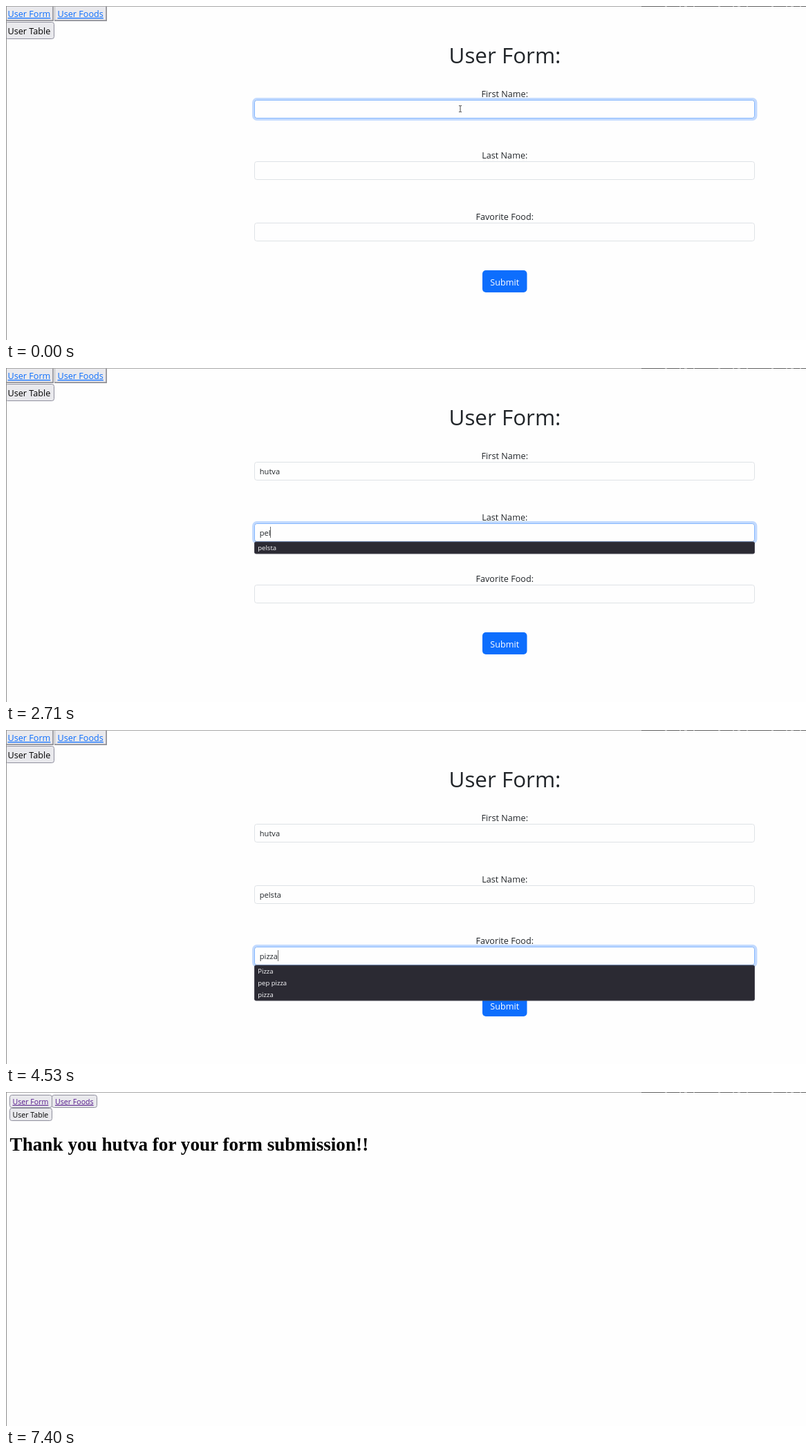
An HTML page that plays this animation: 1157 px wide and 484 px high, repeating every 7.99 s.

```html
<!DOCTYPE html>
<html lang="en">
<head>
<meta charset="utf-8">
<title>User Form</title>
<style>
  html, body { margin: 0; width: 100%; height: 100%; overflow: hidden; background: #fefefe; }
  svg { display: block; width: 1157px; height: 484px; }
  text { font-family: "Open Sans", "Noto Sans", sans-serif; font-size: 12.65px; fill: #212529; }
  .mid { text-anchor: middle; }
  .title { font-size: 31.4px; }
  .value { font-size: 11.1px; }
  .item { font-size: 9.5px; fill: #fbfbfe; }
  .link { fill: #0d6efd; text-decoration: underline; }
  .small { font-size: 10.6px; fill: #000; }
  .visited { fill: #551a8b; text-decoration: underline; }
  .thanks { font: bold 27.2px "Liberation Serif", "Times New Roman", serif; fill: #000; }
</style>
</head>
<body>
<svg id="stage" viewBox="0 0 1157 484" xmlns="http://www.w3.org/2000/svg"></svg>
<script>
const LOOP = 7990;
const FIRST = "hutva", LAST = "pelsta", FOOD = "pizza";
const ROW = 17;
const stage = document.getElementById("stage");

function add(parent, tag, attrs = {}, content) {
  const el = document.createElementNS("http://www.w3.org/2000/svg", tag);
  for (const key in attrs) el.setAttribute(key, attrs[key]);
  if (content !== undefined) el.textContent = content;
  parent.append(el);
  return el;
}
const group = parent => add(parent, "g");
const text = (parent, x, y, cls, content) => add(parent, "text", { x, y, class: cls }, content);
const rect = (parent, x, y, width, height, fill, more) =>
  add(parent, "rect", { x, y, width, height, fill, ...more });
const show = (el, on) => el.setAttribute("visibility", on ? "inherit" : "hidden");

function button(parent, x, y, w, h) {
  rect(parent, x + .5, y + .5, w - 1, h - 1, "#e9e9ed", { rx: 3, stroke: "#8f8f9d" });
}
function outsetButton(parent, x, w) {
  rect(parent, x, 0, w, 22, "#e9e9ed");
  add(parent, "path", { d: `M${x + .5} 22V.5H${x + w}`, stroke: "#b4b4b8", fill: "none" });
  add(parent, "path", { d: `M${x} 21.2H${x + w - .9}V0`, stroke: "#909096", "stroke-width": 1.7, fill: "none" });
}

// Form page
const form = group(stage);
outsetButton(form, 0, 69);
outsetButton(form, 70, 76);
text(form, 2.5, 16, "link", "User Form");
text(form, 74.5, 16, "link", "User Foods");
button(form, -1, 23, 71, 25);
text(form, 2.5, 41.3, "", "User Table").style.fill = "#000";
text(form, 721.5, 83, "mid title", "User Form:");

const fields = ["First Name:", "Last Name:", "Favorite Food:"].map((label, i) => {
  const y = 136 + 89 * i;
  text(form, 721.3, y - 4, "mid", label);
  const ring = rect(form, 357.8, y - 1.3, 726.9, 29.6, "none",
    { rx: 5, stroke: "#0d6efd", "stroke-opacity": .25, "stroke-width": 3.4 });
  rect(form, 359.5, y + .5, 723, 26, "#fefefe", { rx: 3.2, stroke: "#dee2e6" });
  const edge = rect(form, 359.5, y + .5, 723, 26, "none", { rx: 3.2, stroke: "#86b7fe" });
  const value = text(form, 366.8, y + 18, "value", "");
  return { y, ring, edge, value };
});
const caret = rect(form, 367, 0, 1, 16, "#6a6a6a");

rect(form, 689, 383, 64.5, 32, "#0d6efd", { rx: 5 });
text(form, 721.3, 404.8, "mid", "Submit").style.fill = "#fff";

const list = group(form);
const panel = rect(list, 359.5, 0, 723, 0, "#2b2a33", { rx: 2, stroke: "#45444f" });
const items = Array.from({ length: 6 }, (_, i) => text(list, 364.3, i * ROW + 12.4, "item", ""));

// Thank-you page
const done = group(stage);
button(done, 5, 4, 62, 19);
button(done, 66, 4, 66, 19);
button(done, 5, 23, 62, 19);
text(done, 9.5, 17.8, "small visited", "User Form");
text(done, 71, 17.8, "small visited", "User Foods");
text(done, 9.5, 36.6, "small", "User Table");
text(done, 5.5, 85, "thanks", `Thank you ${FIRST} for your form submission!!`);

// Window edges
rect(stage, 0, 0, 1157, 1, "#a8a8a8");
add(stage, "path", { d: "M919 .5H1157", stroke: "#606060", "stroke-dasharray": "34 3 18 2 5 4 9 2", fill: "none" });
rect(stage, 0, 0, 1, 484, "#8e8e8e");

// Pointers, each drawn around its hot spot
const pointers = {
  beam: add(stage, "path", {
    d: "M-2-4.5H-.6L0-4 .6-4.5H2M0-4V4M-2 4.5H-.6L0 4 .6 4.5H2",
    stroke: "#333", "stroke-width": .9, fill: "none" }),
  arrow: add(stage, "path", {
    d: "M.5.5V13L3.4 10.3 5.4 14.8 7.4 13.9 5.5 9.5H9.5Z",
    stroke: "#111", "stroke-width": .8, fill: "#fff" }),
  hand: add(stage, "path", {
    d: "M-1.2 1Q0-.6 1.2 1V5L5 5.8Q6.5 6.2 6.3 8L5.6 12.5H-.8L-4 8.2Q-4.2 6.5-2.6 7L-1.2 8.2Z",
    stroke: "#111", "stroke-width": .9, fill: "#fff" })
};

const start = {
  typed: ["", "", ""], focus: [1, 0, 0], active: 0, caret: false,
  list: [], pointer: ["beam", 657, 149], done: false
};
const names = [FIRST, "Hutva", FIRST + "Hash1"];
const foods = ["Pizza", "pep pizza", FOOD];

// Each step changes only the parts it lists; "type" fills the active field.
const steps = [
  [430, { caret: true }],
  [830, { type: FIRST.slice(0, 1), caret: false, pointer: null }],
  [950, { list: [FIRST, "hello", "hey", "Hutva", FIRST + "Hash1", "hello2"] }],
  [1100, { type: FIRST.slice(0, 2), list: names, caret: true }],
  [1250, { type: FIRST.slice(0, 3) }],
  [1400, { type: FIRST.slice(0, 4) }],
  [1520, { type: FIRST }],
  [2050, { active: 1, focus: [.5, .5, 0], list: [] }],
  [2170, { focus: [0, 1, 0] }],
  [2320, { type: LAST.slice(0, 1) }],
  [2470, { list: [LAST, "plain", "person", "pal", "paper"] }],
  [2590, { type: LAST.slice(0, 2), list: [LAST, "person"] }],
  [2710, { type: LAST.slice(0, 3), list: [LAST] }],
  [2830, { type: LAST.slice(0, 4) }],
  [2980, { type: LAST.slice(0, 5) }],
  [3100, { type: LAST }],
  [3510, { active: 2, focus: [0, .9, .08], list: [] }],
  [3630, { focus: [0, 0, 1] }],
  [3780, { type: FOOD.slice(0, 1) }],
  [3900, { list: [...foods, "pasta"] }],
  [4020, { type: FOOD.slice(0, 2) }],
  [4140, { list: foods }],
  [4260, { type: FOOD.slice(0, 3) }],
  [4410, { type: FOOD.slice(0, 4) }],
  [4530, { type: FOOD }],
  [5090, { caret: false, pointer: ["beam", 659, 134] }],
  [5210, { pointer: ["beam", 704, 148] }],
  [5330, { pointer: ["beam", 734.5, 175] }],
  [5480, { pointer: ["arrow", 741, 255.5] }],
  [5630, { caret: true, pointer: ["hand", 736, 392] }],
  [5750, { pointer: ["hand", 733, 398.5] }],
  [6140, { list: [], caret: false, focus: [0, 0, .5] }],
  [6260, { done: true }],
  [6380, { pointer: ["arrow", 732, 400] }],
  [7250, { pointer: null }]
];

function stateAt(time) {
  const state = { ...start, typed: [...start.typed] };
  for (const [at, change] of steps) {
    if (at > time) break;
    Object.assign(state, change);
    if ("type" in change) state.typed[state.active] = change.type;
  }
  return state;
}

function draw(time) {
  const s = stateAt(time);
  show(form, !s.done);
  show(done, s.done);

  fields.forEach((f, i) => {
    f.value.textContent = s.typed[i];
    f.ring.setAttribute("opacity", s.focus[i]);
    f.edge.setAttribute("opacity", s.focus[i]);
  });

  const field = fields[s.active];
  const width = s.typed[s.active] ? field.value.getComputedTextLength() : 0;
  caret.setAttribute("x", Math.round(366.6 + width));
  caret.setAttribute("y", field.y + 5);
  show(caret, s.caret);

  show(list, s.list.length > 0);
  list.setAttribute("transform", `translate(0 ${field.y + 27})`);
  panel.setAttribute("height", s.list.length * ROW);
  items.forEach((item, i) => { item.textContent = s.list[i] || ""; });

  for (const kind in pointers) {
    const on = s.pointer !== null && s.pointer[0] === kind;
    show(pointers[kind], on);
    if (on) pointers[kind].setAttribute("transform", `translate(${s.pointer[1]} ${s.pointer[2]})`);
  }
}

const began = performance.now();
function tick() {
  draw((performance.now() - began) % LOOP);
  requestAnimationFrame(tick);
}
tick();
</script>
</body>
</html>
```
